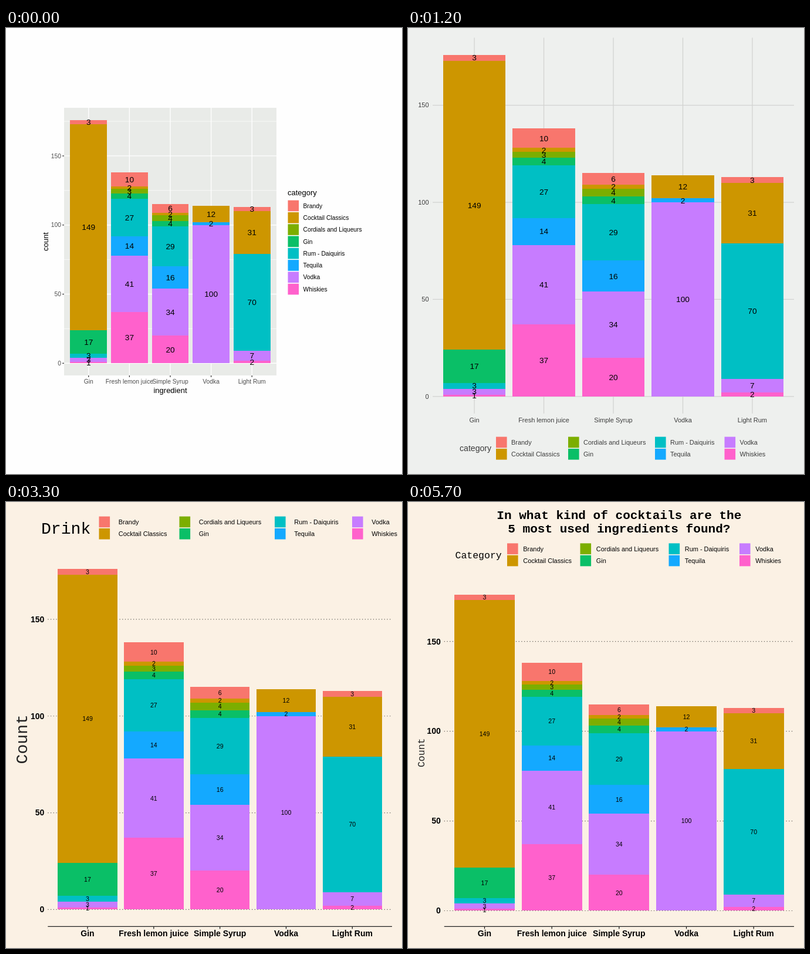
Animation of 675x760 px, one loop 8 s. Source, as an HTML page with a canvas:

```html
<!DOCTYPE html>
<html lang="en">
<head>
<meta charset="utf-8">
<style>
html, body { margin: 0; width: 100%; height: 100%; overflow: hidden; }
canvas { display: block; }
</style>
</head>
<body>
<canvas id="stage" width="675" height="760"></canvas>
<script>
const ctx = document.getElementById('stage').getContext('2d');
const SANS = '"Liberation Sans", Arial, sans-serif';
const MONO = '"Liberation Mono", "Courier New", monospace';

const categories = [
  ['Brandy', '#f8766d'], ['Cocktail Classics', '#cd9600'],
  ['Cordials and Liqueurs', '#7cae00'], ['Gin', '#0abf67'],
  ['Rum - Daiquiris', '#00bfc4'], ['Tequila', '#14a9ff'],
  ['Vodka', '#c77cff'], ['Whiskies', '#ff61cc']
];
// Counts per ingredient, in category order
const bars = [
  ['Gin', [3, 149, 0, 17, 3, 0, 3, 1]],
  ['Fresh lemon juice', [10, 2, 3, 4, 27, 14, 41, 37]],
  ['Simple Syrup', [6, 2, 4, 4, 29, 16, 34, 20]],
  ['Vodka', [0, 12, 0, 0, 0, 2, 100, 0]],
  ['Light Rum', [3, 31, 0, 0, 70, 0, 7, 2]]
];

const gray = {
  bg: '#fefefe', panel: '#e9ebe8', grid: '#fff', gridW: 1.3, dash: [], vGrid: true, minor: true,
  axis: null, tickX: 3, tickY: 3, tickInk: '#333', labelSize: 13.7,
  axisFont: SANS, axisSize: 10.3, axisInk: '#4d4d4d', weight: '', xGap: 10.5, yGap: 5, yLeft: null,
  yTitle: 'count', xTitle: 'ingredient', nameFont: SANS, nameSize: 13, nameInk: '#000', yTitleX: 12, xTitleGap: 25,
  keys: [533.5], keyShift: 0, row: 303, textGap: 26, textSize: 10.3, textInk: '#000',
  legend: 'category', legendX: 533, legendFont: SANS, legendSize: 13,
  title: [], titleSize: 0, center: false,
  left: 45, right: 514, top: 6, bottom: 722
};
const fiveThirty = {
  bg: '#eef0ee', panel: null, grid: '#d2d3d1', gridW: 1.3, minor: false, tickX: 0, tickY: 0,
  axisSize: 11, axisInk: '#3c3c3c', xGap: 11.5, yGap: 6.5, yTitle: '', xTitle: '',
  keys: [150, 273, 421, 539.5], row: 706, textSize: 10.95, textInk: '#3c3c3c',
  legendX: 88, legendSize: 14.1, left: 42, right: 658, top: 16.5, bottom: 657
};
const docs = {
  bg: '#fff', frame: '#000', grid: '#ccc', gridW: 1.2, vGrid: false, axis: '#000', tickX: 3,
  axisInk: '#000', yTitle: 'count', xTitle: 'ingredient', nameSize: 13, nameInk: '#666', yTitleX: 20, xTitleGap: 26,
  keys: [525.5], row: 303, textInk: '#666', legendX: 525, legendSize: 13,
  left: 55, right: 508, top: 14, bottom: 714
};
const economist = {
  bg: '#d5e3e9', frame: null, grid: '#fff', gridW: 2.3, axis: '#222', tickX: -5,
  axisSize: 12.95, axisInk: '#111', xGap: 14, yLeft: 24, nameInk: '#000', yTitleX: 19, xTitleGap: 25.5,
  keys: [91, 248, 440.5, 590.5], row: 31, textGap: 25.3, textSize: 16.2, textInk: '#000',
  legendX: 33, left: 52, right: 663, top: 80.4, bottom: 715.4
};
const journal = {
  bg: '#fbf1e4', grid: '#5c5852', gridW: 1.2, dash: [1.2, 3.5], tickX: 4, tickInk: '#111',
  axisSize: 14, axisInk: '#000', weight: 'bold ', xGap: 12, yGap: 6, yLeft: null,
  yTitle: '', xTitle: '', nameFont: MONO, nameSize: 28.1, nameInk: '#222',
  keys: [158.5, 295.5, 458, 590], keyShift: 13.3, row: 34, textGap: 33.3, textSize: 10.95,
  legendX: 23.7, legendFont: MONO, legendSize: 28.1, left: 47, right: 658, top: 85.2, bottom: 723.4
};

const HEAD = 'In what kind of cocktails are the';
const oneLine = HEAD + ' 5 most used ingredients found?';
// Each step changes only what differs from the one before, every 300 ms
const steps = [
  { ...gray, left: 99, right: 461, top: 136, bottom: 592, yTitleX: 67, keys: [480.5], legendX: 480 },
  { ...gray, top: 133, bottom: 595 },
  { top: 49, bottom: 680 },
  { top: 6, bottom: 722 },
  fiveThirty,
  { labelSize: 28.3 },
  { labelSize: 14 },
  { labelSize: 10.6 },
  docs,
  economist,
  journal,
  { yTitle: 'Count', yTitleX: 26, legend: 'Drink', legendX: 60, keyShift: 0, left: 71.3 },
  { title: [oneLine.replace('cocktails', 'drinks')], titleSize: 28.1, row: 66, top: 117 },
  { title: [oneLine], legend: 'Category', legendX: 35, keyShift: 25.3 },
  { nameSize: 16.5, yTitleX: 22, legendSize: 16.5, legendX: 80.5, keyShift: 0,
    keys: [169, 293.5, 444.5, 565], textGap: 27.3, left: 61.7 },
  { titleSize: 18.75, row: 55.5, top: 106.4 },
  { title: [HEAD, '5 most used ingredients present?'], row: 76, top: 127 },
  { center: true },
  { titleSize: 21.07, row: 79.8, top: 131.2 },
  { title: [HEAD, '5 most used ingredients found?'] }
];
const states = [];
steps.forEach((step, i) => states.push({ ...states[i - 1], ...step }));

function text(str, x, y, size, ink, align = 'left', font = SANS, weight = '') {
  ctx.font = `${weight}${size}px ${font}`;
  ctx.fillStyle = ink;
  ctx.textAlign = align;
  ctx.fillText(str, x, y);
}
// Places the text by the middle of its capitals
function midText(str, x, y, size, ...rest) {
  text(str, x, y + size * 0.35, size, ...rest);
}
function line(x1, y1, x2, y2, ink, width, dash = []) {
  ctx.strokeStyle = ink;
  ctx.lineWidth = width;
  ctx.setLineDash(dash);
  ctx.beginPath();
  ctx.moveTo(x1, y1);
  ctx.lineTo(x2, y2);
  ctx.stroke();
}
function box(x1, y1, x2, y2, ink) {
  const [a, b, c, d] = [x1, y1, x2, y2].map(Math.round);
  ctx.fillStyle = ink;
  ctx.fillRect(a, b, c - a, d - b);
}

function drawGrid(s, yAt, xAt) {
  if (s.panel) box(s.left, s.top, s.right, s.bottom, s.panel);
  if (s.minor) for (let v = 25; v < 180; v += 50) line(s.left, yAt(v), s.right, yAt(v), s.grid, 0.65);
  for (let v = 0; v <= 150; v += 50) {
    const y = yAt(v);
    line(s.left, y, s.right, y, s.grid, s.gridW, s.dash);
    if (s.tickY) line(s.left - s.tickY, y, s.left, y, s.tickInk, 1.2);
    const x = s.yLeft ?? s.left - s.yGap;
    midText(v, x, y, s.axisSize, s.axisInk, s.yLeft ? 'left' : 'right', s.axisFont, s.weight);
  }
  if (s.vGrid) bars.forEach((_, i) => line(xAt(i), s.top, xAt(i), s.bottom, s.grid, s.gridW));
}

function drawBars(s, yAt, xAt, step) {
  const labels = [];
  bars.forEach(([name, counts], i) => {
    const x = xAt(i);
    let sum = 0;
    for (let c = counts.length - 1; c >= 0; c--) {
      const n = counts[c];
      if (!n) continue;
      box(x - step * 0.45, yAt(sum + n), x + step * 0.45, yAt(sum), categories[c][1]);
      labels.push([n, x, yAt(sum + n / 2)]);
      sum += n;
    }
    if (s.tickX) line(x, s.bottom, x, s.bottom + s.tickX, s.tickInk, 1.2);
    midText(name, x, s.bottom + s.xGap, s.axisSize, s.axisInk, 'center', s.axisFont, s.weight);
  });
  if (s.axis) line(s.left, s.bottom, s.right, s.bottom, s.axis, 1.2);
  labels.forEach(([n, x, y]) => midText(n, x, y, s.labelSize, '#000', 'center'));
}

function drawLegend(s) {
  const rows = categories.length / s.keys.length;
  const titleY = rows > 2 ? s.row - 22.5 : s.row + 10;
  midText(s.legend, s.legendX, titleY, s.legendSize, s.textInk, 'left', s.legendFont);
  categories.forEach(([name, ink], i) => {
    const x = s.keys[Math.floor(i / rows)] + s.keyShift;
    const y = s.row + (i % rows) * 20.3;
    ctx.fillStyle = ink;
    ctx.fillRect(x, y - 9.4, 18.6, 18.7);
    midText(name, x + s.textGap, y, s.textSize, s.textInk);
  });
}

function drawTitles(s) {
  const midX = (s.left + s.right) / 2;
  midText(s.xTitle, midX, s.bottom + s.xTitleGap, s.nameSize, s.nameInk, 'center');
  ctx.save();
  ctx.translate(s.yTitleX, (s.top + s.bottom) / 2);
  ctx.rotate(-Math.PI / 2);
  midText(s.yTitle, 0, 0, s.nameSize, s.nameInk, 'center', s.nameFont);
  ctx.restore();
  s.title.forEach((str, i) => {
    const y = 16 + s.titleSize * (0.61 + i * 1.09);
    text(str, s.center ? midX : s.left, y, s.titleSize, '#000', s.center ? 'center' : 'left', MONO, 'bold ');
  });
}

function draw(s) {
  const step = (s.right - s.left) / 5.2;
  const unit = (s.bottom - s.top) / 193.6;
  const xAt = i => s.left + step * (i + 0.6);
  const yAt = v => s.bottom - unit * (v + 8.8);
  box(0, 0, 675, 760, s.bg);
  drawGrid(s, yAt, xAt);
  drawBars(s, yAt, xAt, step);
  drawLegend(s);
  drawTitles(s);
  if (s.frame) {
    ctx.strokeStyle = s.frame;
    ctx.lineWidth = 1;
    ctx.setLineDash([]);
    ctx.strokeRect(0.5, 0.5, 674, 759);
  }
}

let shown = -1;
function tick() {
  const i = Math.min(Math.floor((performance.now() % 8000) / 300), states.length - 1);
  if (i !== shown) draw(states[shown = i]);
  requestAnimationFrame(tick);
}
tick();
</script>
</body>
</html>
```
